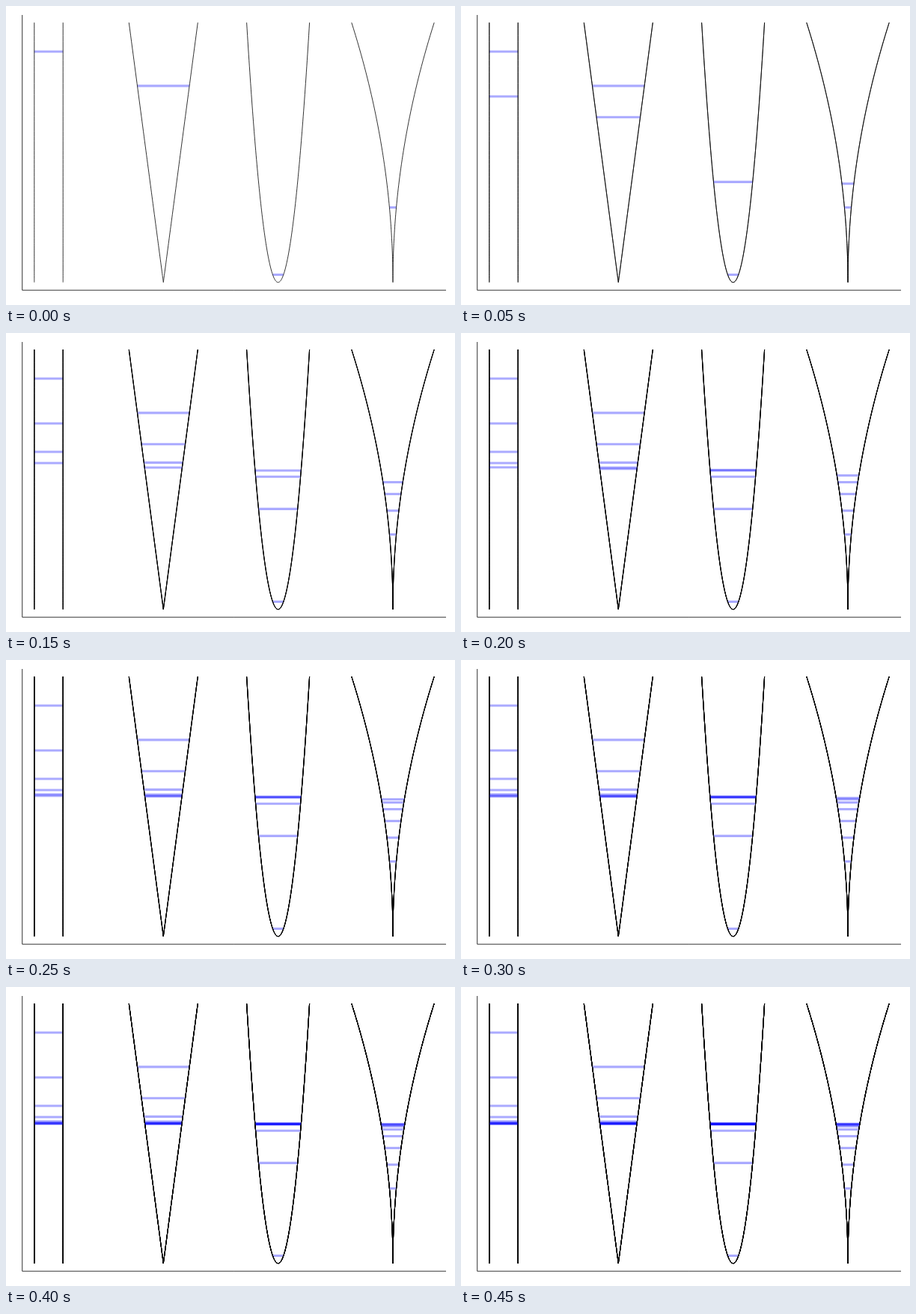
An HTML page with a canvas that plays this animation: 600 by 400 pixels, repeating every 500 ms.

```html
<!DOCTYPE html>
<html lang="en">
<head>
<meta charset="utf-8">
<title>Communicating vessels</title>
<style>
  html, body { margin: 0; width: 100%; height: 100%; overflow: hidden; background: #fff; }
  canvas { display: block; }
</style>
</head>
<body>
<canvas id="stage" width="600" height="400"></canvas>
<script>
const ctx = document.getElementById('stage').getContext('2d');
const STEP = 50, COUNT = 10;
const BOTTOM = 369.7, HEIGHT = 347.5;

// Half width at height h: half * (h / HEIGHT) ^ power
const vessels = [
  { x: 57, half: 19.2, power: 0,
    levels: [61, 121, 159, 174, 179.8, 181.6, 182.4, 182.7, 182.9, 183] },
  { x: 210.3, half: 46, power: 1,
    levels: [106.9, 148.8, 173.4, 180, 181.8, 182.5, 182.8, 182.9, 183, 183] },
  { x: 363.6, half: 42, power: 0.5,
    levels: [359.5, 235.4, 192.2, 184, 183.2, 183.1, 183.1, 183.1, 183.1, 183.1] },
  { x: 517, half: 55.2, power: 2,
    levels: [269.5, 237.7, 215.4, 199.6, 190.6, 186.4, 184.6, 183.8, 183.4, 183.2] }
];

const halfAt = (v, h) => v.half * Math.pow(h / HEIGHT, v.power);

function wallPath(v) {
  const path = new Path2D();
  for (const side of [-1, 1]) {
    for (let i = 0; i <= 80; i++) {
      const h = HEIGHT * (i / 80) ** 2;
      path.lineTo(v.x + side * halfAt(v, h), BOTTOM - h);
    }
    if (side < 0) path.moveTo(v.x + halfAt(v, 0), BOTTOM);
  }
  return path;
}

vessels.forEach(v => { v.wall = wallPath(v); });
const axes = new Path2D('M21.7 12V380.2H588');

function stroke(path, color, width) {
  ctx.strokeStyle = color;
  ctx.lineWidth = width;
  ctx.stroke(path);
}

function drawLevel(v, y) {
  const half = halfAt(v, BOTTOM - y);
  const line = new Path2D();
  line.moveTo(v.x - half, y);
  line.lineTo(v.x + half, y);
  stroke(line, 'rgba(0,0,255,0.333)', 3.1);
}

function draw(steps) {
  ctx.fillStyle = '#fff';
  ctx.fillRect(0, 0, 600, 400);
  stroke(axes, '#000', 0.8);
  // Every step is laid over the last, so overlapping strokes darken
  for (let i = 0; i < steps; i++) {
    for (const v of vessels) {
      drawLevel(v, v.levels[i]);
      stroke(v.wall, '#000', 0.8);
    }
  }
}

let shown = 0;
function tick() {
  const steps = 1 + Math.floor(performance.now() / STEP) % COUNT;
  if (steps !== shown) draw(shown = steps);
  requestAnimationFrame(tick);
}
tick();
</script>
</body>
</html>
```
